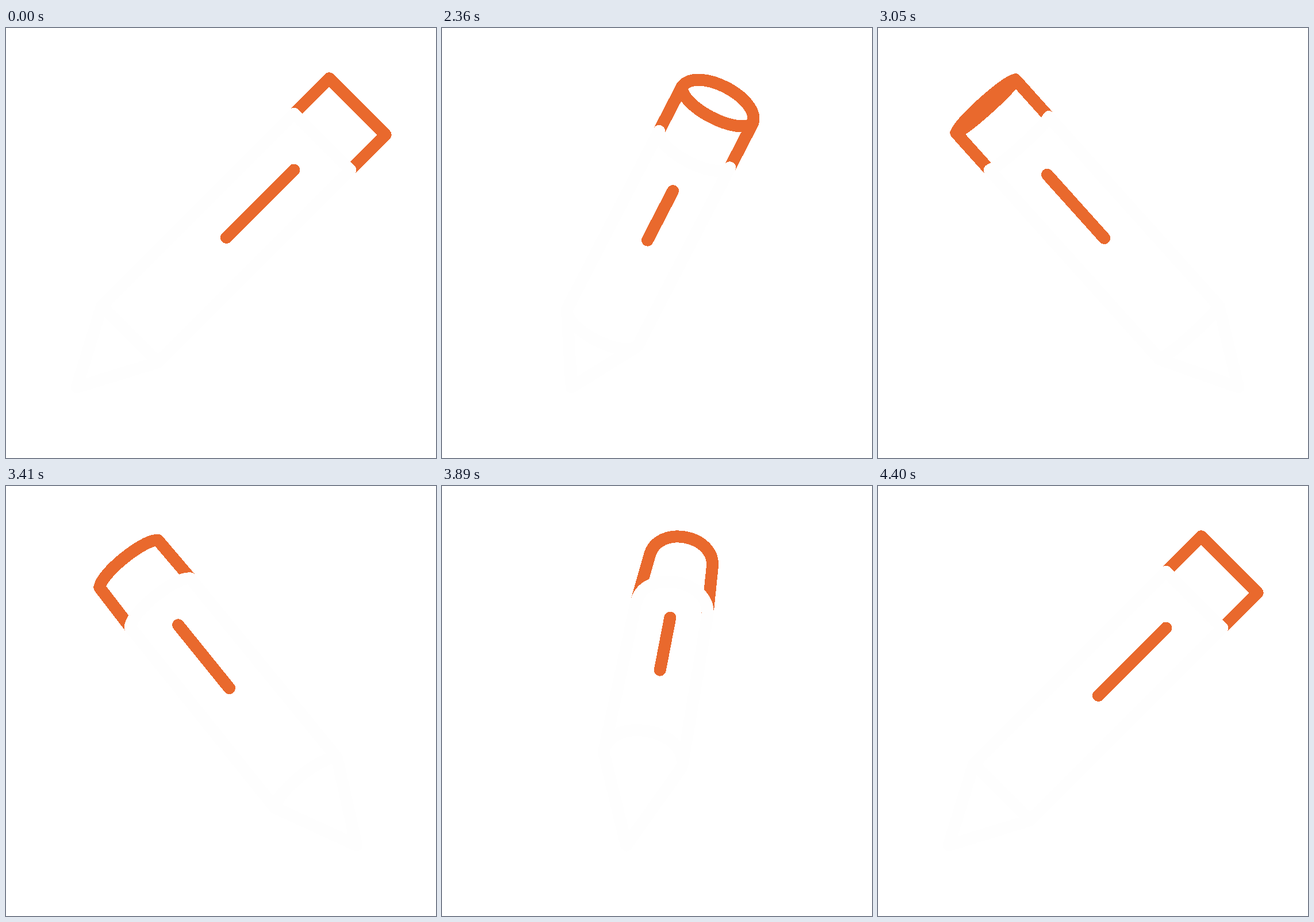
Animation, 748 px wide and 748 px high, one loop 4430 ms. Source, as an HTML page:

```html
<!DOCTYPE html>
<html lang="en">
<head>
<meta charset="utf-8">
<title>Turning pencil</title>
<style>
  html, body { margin: 0; width: 100%; height: 100%; overflow: hidden; background: #fff; }
  svg { display: block; width: 100vw; height: 100vh; }
  path {
    fill: none; stroke-width: 21; stroke-linecap: round; stroke-linejoin: round;
    shape-rendering: crispEdges;
  }
  .accent { stroke: #e9692d; }
  .body { stroke: #fefefe; }
</style>
</head>
<body>
<svg viewBox="0 0 748 748">
  <path class="accent" id="cap"/>
  <path class="body" id="shaft"/>
  <path class="accent" id="mark"/>
</svg>
<script>
const LOOP = 4430, START = 2000, HOLD = 2030, TURN = 2400, STEP = 30;
const PIVOT = { x: 383.5, y: 364.5 }, RADIUS = 69.3;

// Places along the pencil: resting height, vertical shift when the cap
// faces the viewer or points away, and narrowing when it points away.
const parts = {
  cap:      { y: 136.8, toward: -5,  away: -5,  narrow: 14.5 },
  collar:   { y: 198,   toward: 20,  away: 20,  narrow: 6.5 },
  markTop:  { y: 247,   toward: 56,  away: -19 },
  markEnd:  { y: 364.5, toward: 7,   away: -47 },
  shoulder: { y: 532.5, toward: -17, away: -60, narrow: 0 },
  tip:      { y: 625,   toward: 0,   away: 0 }
};

const pt = p => p.x.toFixed(2) + " " + p.y.toFixed(2);
const line = (...points) => "M" + points.map(pt).join("L");

// Half-ellipse-like curve from a to b; a positive bulge rises to the cap end.
function rim(a, b, bulge) {
  const len = Math.hypot(b.x - a.x, b.y - a.y);
  const ux = (b.x - a.x) / len, uy = (b.y - a.y) / len;
  const lift = bulge * 4 / 3;
  const inset = Math.max(0, (50 - Math.abs(bulge)) / 2);
  const control = (p, dir) => ({
    x: p.x + uy * lift + dir * ux * inset,
    y: p.y - ux * lift + dir * uy * inset
  });
  return line(a) + "C" + [control(a, 1), control(b, -1), b].map(pt).join(" ");
}

const set = (id, d) => document.getElementById(id).setAttribute("d", d);

function draw(angle) {
  const cos = Math.cos(angle), sin = Math.sin(angle), depth = sin * sin;
  const facing = sin > 0;
  const lean = cos * (1 - 0.185 * depth);
  const crossing = PIVOT.y - 70 * depth;

  // Every part lies on one slanted axis.
  function place({ y, toward, away }) {
    y += depth * (facing ? toward : away);
    return { x: PIVOT.x + lean * (crossing - y), y };
  }
  function ends(part) {
    const mid = place(part);
    const half = RADIUS - (facing ? 0 : part.narrow * depth);
    const dx = half / Math.hypot(1, lean), dy = dx * lean;
    return [{ x: mid.x - dx, y: mid.y - dy }, { x: mid.x + dx, y: mid.y + dy }];
  }

  const [capL, capR] = ends(parts.cap);
  const [colL, colR] = ends(parts.collar);
  const [shL, shR] = ends(parts.shoulder);
  const far = (49 + 3 * sin) * depth, near = 37 * depth;
  const band = facing ? -near : far * 1.15;

  set("cap", line(colL, capL) + rim(capL, capR, far).replace(/^M/, "L") + "L" + pt(colR) +
    (facing ? rim(capL, capR, -near) : ""));
  set("shaft", rim(colL, colR, band) + rim(shL, shR, band) +
    line(colL, shL, place(parts.tip), shR, colR));
  set("mark", line(place(parts.markTop), place(parts.markEnd)));
}

const origin = performance.now();
function tick() {
  const t = (performance.now() - origin) % LOOP;
  const stepped = HOLD + Math.floor((t - HOLD) / STEP) * STEP;
  draw(t < HOLD ? 0 : (stepped - START) / TURN * 2 * Math.PI);
  requestAnimationFrame(tick);
}
draw(0);
requestAnimationFrame(tick);
</script>
</body>
</html>
```
